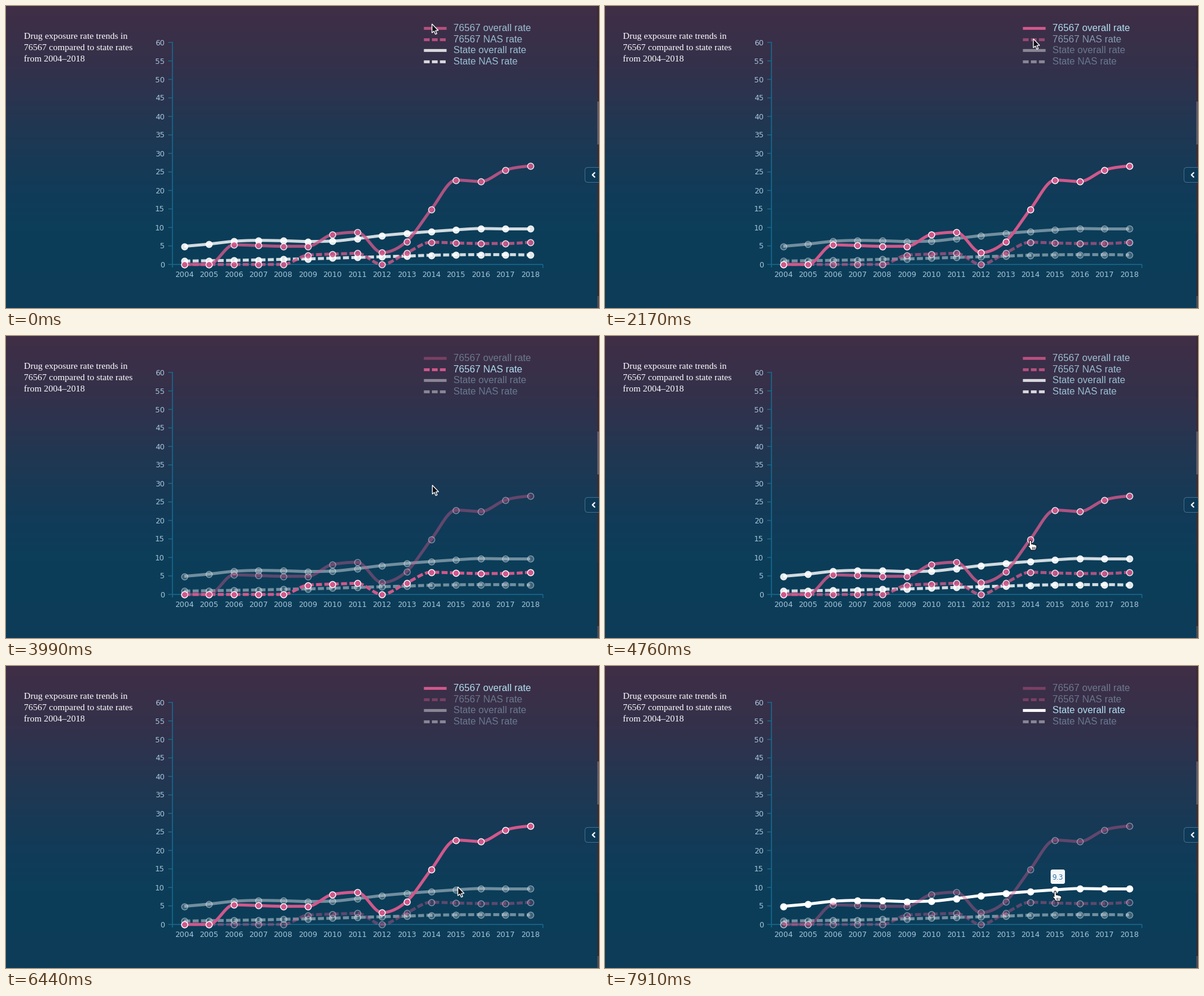
Recreate the animation shown at these times as a matplotlib script. Size 994 by 506 pixels, loop 8000 ms.

```python
import numpy as np
import matplotlib.pyplot as plt
from matplotlib.animation import FuncAnimation
from matplotlib.patches import FancyBboxPatch, Polygon, Rectangle

W, H, DPI = 994, 506, 64           # a power of two keeps the size exact
PX = 72 / DPI                      # points per pixel
FRAMES, INTERVAL = 160, 50
NORMAL, BRIGHT, DIM = 0.82, 1.0, 0.42
PINK, WHITE = (0.82, 0.345, 0.545), (1.0, 1.0, 1.0)
AXIS, LABEL = "#17688c", "#a6c6da"
LEGEND_TEXT = (0.69, 0.875, 0.945)

fig = plt.figure(figsize=(W / DPI, H / DPI), dpi=DPI)
ax = fig.add_axes([0, 0, 1, 1])
ax.set_axis_off()


def rgb(r, g, b):
    return r / 255, g / 255, b / 255


def label(x, y, s, size, color, font="DejaVu Sans", **kw):
    return ax.text(x, y, s, fontsize=size * PX, color=color, family=font,
                   va="baseline", **kw)


def stroke(xs, ys, color, width, **kw):
    return ax.plot(xs, ys, color=color, lw=width * PX,
                   solid_capstyle="butt", dash_capstyle="butt", **kw)[0]


def box(x, y, w, h, radius, **kw):
    shape = FancyBboxPatch((x, y), w, h,
                           boxstyle=f"round,pad=0,rounding_size={radius}", **kw)
    return ax.add_patch(shape)


def draw_backdrop():
    stops = [0, 100, 150, 200, 300, 390, 506]
    colors = np.array([(64, 46, 70), (52, 49, 75), (43, 52, 79), (33, 55, 82),
                       (18, 59, 88), (11, 62, 90), (13, 60, 88)]) / 255
    rows = np.arange(H) + 0.5
    sky = np.stack([np.interp(rows, stops, c) for c in colors.T], axis=1)
    ax.imshow(sky[:, None, :], extent=(0, W, H, 0), aspect="auto",
              interpolation="nearest", zorder=0)
    # page edge with its scrollbar
    for y, h, c in [(0, 160, (62, 42, 50)), (160, 72, (98, 90, 100)),
                    (232, 148, (58, 46, 52)), (380, 106, (48, 44, 52)),
                    (486, 20, (78, 74, 82))]:
        ax.add_patch(Rectangle((991, y), 3, h, fc=rgb(*c), lw=0, zorder=1))
    ax.add_patch(Rectangle((991, 93), 5, 8, fc="none", ec="#22284a",
                           lw=PX, zorder=1))
    box(970.5, 270.5, 34, 25, 5, fc="#0e3a58", ec="#456f8c", lw=PX, zorder=2)
    stroke([987.3, 983, 987.3], [278.8, 283, 287.2], "white", 2.2, zorder=3)


def year_x(k):
    return 298.9 + 41.4 * np.asarray(k)


def value_y(v):
    return 433 - 6.2 * np.asarray(v)


def draw_axes():
    stroke([279, 279], [60, 438], AXIS, 1.7, zorder=2)
    stroke([279, 900], [433, 433], AXIS, 1.7, zorder=2)
    stroke([899.5, 899.5], [433, 438.5], AXIS, 1.5, zorder=2)
    for v in range(0, 61, 5):
        y = float(value_y(v))
        stroke([272, 279], [y, y], AXIS, 1.5, zorder=2)
        label(266, y + 4.5, str(v), 12.5, LABEL, ha="right")
    for k in range(15):
        label(year_x(k), 454, str(2004 + k), 12.5, LABEL, ha="center")
    title = ("Drug exposure rate trends in", "76567 compared to state rates",
             "from 2004–2018")
    for k, line in enumerate(title):
        label(30, 54.7 + 19.1 * k, line, 15.2, "white", "Liberation Serif")


def monotone(x, y, per_segment=16):
    """Monotone cubic through the points, without overshoot."""
    s = np.diff(y) / np.diff(x)
    m = np.empty_like(y)
    a, b = s[:-1], s[1:]
    m[1:-1] = (np.sign(a) + np.sign(b)) * np.minimum(
        np.minimum(abs(a), abs(b)), abs(a + b) / 4)
    m[0], m[-1] = (3 * s[0] - m[1]) / 2, (3 * s[-1] - m[-2]) / 2
    h = x[1] - x[0]
    xs = np.linspace(x[0], x[-1], per_segment * (len(x) - 1) + 1)
    i = np.minimum(((xs - x[0]) / h).astype(int), len(x) - 2)
    u = (xs - x[i]) / h
    ys = ((1 + 2 * u) * (1 - u) ** 2 * y[i] + u * (1 - u) ** 2 * h * m[i]
          + u * u * (3 - 2 * u) * y[i + 1] + u * u * (u - 1) * h * m[i + 1])
    return xs, ys


class Series:
    def __init__(self, row, name, color, dashed, values, fade, z):
        self.color, self.fade = color, fade
        dash = {"dashes": (2, 0.8)} if dashed else {}
        x, y = year_x(np.arange(15)), value_y(values)
        self.lines = [stroke(*monotone(x, y), color, 5, zorder=z, **dash)]
        self.dots = ax.plot(x, y, "o", ms=10.4 * PX, mew=1.4 * PX,
                            zorder=z + 0.5)[0]
        ly = 37 + 18.5 * row
        self.lines.append(stroke([700, 738], [ly, ly], color, 4.8,
                                 zorder=5, **dash))
        self.text = label(750, ly + 5.4, name, 16.1, LEGEND_TEXT,
                          "Liberation Sans")

    def update(self, t):
        a = float(np.interp(t, *zip(*self.fade)))
        levels = [DIM, NORMAL, BRIGHT]
        for line in self.lines:
            line.set_alpha(a)
        self.text.set_alpha(a)
        face = np.interp(a, levels, [0.2, 0.88, 1])
        edge = np.interp(a, levels, [0.42, 0.88, 1])
        self.dots.set_markerfacecolor((*self.color, face))
        self.dots.set_markeredgecolor((*WHITE, edge))


class Tooltip:
    def __init__(self, x, y, value, width, fade):
        self.fade = fade
        self.parts = [
            box(x - width / 2, y - 12, width, 24, 3, fc="#f4f7fa", lw=0,
                zorder=9),
            label(x, y + 4.6, value, 11.6, "#2f73a8", ha="center", zorder=10)]

    def update(self, t):
        a = float(np.interp(t, *zip(*self.fade)))
        for part in self.parts:
            part.set_alpha(a)
            part.set_visible(a > 0)


ARROW = np.array([(0, 0), (0, 15), (3.4, 12), (5.8, 17.4), (8.2, 16.3),
                  (5.9, 11.2), (10.6, 11)])
HAND = np.array([(-1.6, 1), (0, -0.6), (1.7, 1), (1.9, 6.3), (4, 5.8),
                 (5, 6.8), (7, 6.5), (8, 7.6), (9.8, 7.8), (10.6, 9.5),
                 (10, 13), (8.6, 16.4), (1, 16.4), (-1, 12.8), (-4.2, 9.6),
                 (-3.7, 8), (-1.6, 9)])


def ease_in_out(u):
    return u * u * (3 - 2 * u)


def ease_out(u):
    return u * (2 - u)


# start, end, destination, easing
MOVES = [(70, 560, (720, 36), ease_in_out),
         (1680, 2100, (718, 55), ease_in_out),
         (3430, 4690, (713, 342.5), ease_out),
         (5950, 6440, (757.5, 370), ease_in_out),
         (6440, 6650, (754.5, 377.5), ease_in_out)]


def cursor_at(t):
    pos = np.array([714.0, 30.0])
    for start, end, goal, ease in MOVES:
        u = np.clip((t - start) / (end - start), 0, 1)
        pos = pos + (np.array(goal) - pos) * ease(u)
    return pos


def is_pointing(t):
    return 4650 <= t < 6020 or t >= 6620


draw_backdrop()
draw_axes()

dimmed_first = [(840, NORMAL), (1120, DIM)]
restored = [(4060, DIM), (4410, NORMAL)]
dimmed_again = [(5040, NORMAL), (5320, DIM)]
background_fade = dimmed_first + restored + dimmed_again

series = [
    Series(0, "76567 overall rate", PINK, False,
           [0, 0, 5.3, 5.1, 4.9, 4.9, 8.1, 8.7, 3.2, 6.2, 14.9, 22.8, 22.4,
            25.5, 26.6],
           [(420, NORMAL), (630, BRIGHT), (2450, BRIGHT), (2800, DIM)]
           + restored + [(4760, NORMAL), (4970, BRIGHT), (6800, BRIGHT),
                         (7070, DIM)], 6),
    Series(1, "76567 NAS rate", PINK, True,
           [0, 0, 0, 0, 0, 2.5, 2.8, 3, 0, 3.1, 6, 5.8, 5.65, 5.65, 6],
           dimmed_first + [(2100, DIM), (2310, BRIGHT), (4060, BRIGHT),
                           (4410, NORMAL)] + dimmed_again, 5),
    Series(2, "State overall rate", WHITE, False,
           [4.9, 5.5, 6.25, 6.5, 6.4, 6.2, 6.3, 7, 7.8, 8.4, 8.9, 9.35, 9.7,
            9.6, 9.6],
           background_fade + [(6650, DIM), (6860, BRIGHT)], 4),
    Series(3, "State NAS rate", WHITE, True,
           [0.9, 1, 1.1, 1.2, 1.4, 1.5, 1.7, 1.9, 2.1, 2.25, 2.5, 2.6, 2.65,
            2.65, 2.55],
           background_fade, 3),
]
tooltips = [
    Tooltip(717.5, 318.5, "14.9", 32,
            [(4780, 0), (4970, 1), (6000, 1), (6200, 0)]),
    Tooltip(759, 353, "9.3", 24, [(6680, 0), (6870, 1)]),
]
arrow = ax.add_patch(Polygon(ARROW, fc="#101018", ec="white", lw=1.3 * PX,
                             zorder=12))
hand = ax.add_patch(Polygon(HAND, fc="white", ec="#101018", lw=1.1 * PX,
                            zorder=12))
creases = [stroke([], [], "#101018", 0.9, zorder=13) for _ in range(3)]

ax.set_xlim(0, W)
ax.set_ylim(H, 0)


def update(i):
    t = (i + 0.5) * INTERVAL
    for item in series + tooltips:
        item.update(t)
    pos, pointing = cursor_at(t), is_pointing(t)
    arrow.set_xy(ARROW + pos)
    hand.set_xy(HAND + pos)
    arrow.set_visible(not pointing)
    hand.set_visible(pointing)
    for k, crease in enumerate(creases):
        x = pos[0] + 2.6 + 2.2 * k
        crease.set_data([x, x], [pos[1] + 10, pos[1] + 14])
        crease.set_visible(pointing)
    return []


anim = FuncAnimation(fig, update, frames=FRAMES, interval=INTERVAL,
                     repeat=True, repeat_delay=0, blit=False)
plt.show()
```
